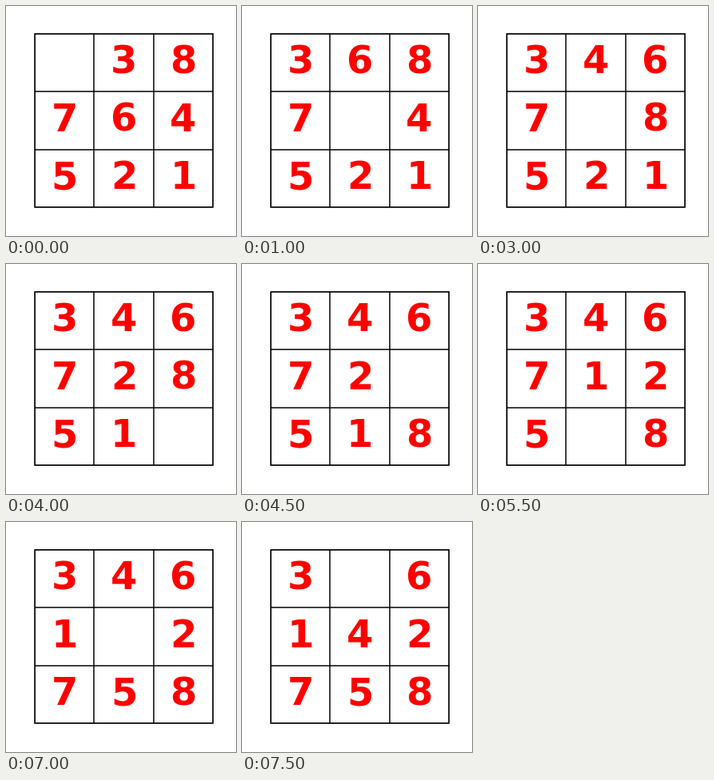
An HTML page that plays this animation: 288x288 px, repeating every 8000 ms.

```html
<!DOCTYPE html>
<html lang="en">
<head>
<meta charset="utf-8">
<title>Sliding puzzle</title>
<style>
  html, body { margin: 0; width: 100%; height: 100%; overflow: hidden; background: #fff; }
  svg { display: block; width: 288px; height: 288px; }
  text { font: bold 48px "DejaVu Sans", sans-serif; fill: #f00; }
  path { fill: none; stroke: #000; }
</style>
</head>
<body>
<svg viewBox="0 0 288 288">
  <path stroke-width="1.5" d="M36 35H259V252H36ZM110 35V252M185 35V252M36 107H259M36 180H259"/>
  <path stroke-width="0.8" d="M36.5 34.5H259.5V251.5H36.5Z"/>
</svg>
<script>
  const STEP = 500;
  const START = [0, 3, 8, 7, 6, 4, 5, 2, 1];
  // Cell of the gap at each step
  const GAP = [0, 1, 4, 5, 2, 1, 4, 7, 8, 5, 4, 7, 6, 3, 4, 1];
  // Optical shift of single digits before snapping to whole pixels
  const SHIFT_X = { 2: 0.2, 4: -0.4, 5: 0.2, 6: -0.4 };
  const SHIFT_Y = { 5: 0.6, 6: -0.4, 8: -0.4 };

  const boards = [START];
  for (let i = 1; i < GAP.length; i++) {
    const board = boards[i - 1].slice();
    board[GAP[i - 1]] = board[GAP[i]];
    board[GAP[i]] = 0;
    boards.push(board);
  }

  const svg = document.querySelector("svg");
  const tiles = START.map((_, digit) => {
    if (!digit) return null;
    const tile = document.createElementNS(svg.namespaceURI, "text");
    tile.textContent = digit;
    return svg.appendChild(tile);
  });

  function draw(board) {
    board.forEach((digit, cell) => {
      if (!digit) return;
      const col = cell % 3, row = Math.floor(cell / 3);
      tiles[digit].setAttribute("x", Math.round(57 + 74.4 * col + (SHIFT_X[digit] || 0)));
      tiles[digit].setAttribute("y", Math.round(84.1 + 72.5 * row + (SHIFT_Y[digit] || 0)));
    });
  }

  const begin = performance.now();
  let shown = -1;
  function tick() {
    const step = Math.floor((performance.now() - begin) / STEP) % boards.length;
    if (step !== shown) draw(boards[shown = step]);
    requestAnimationFrame(tick);
  }
  tick();
</script>
</body>
</html>
```
